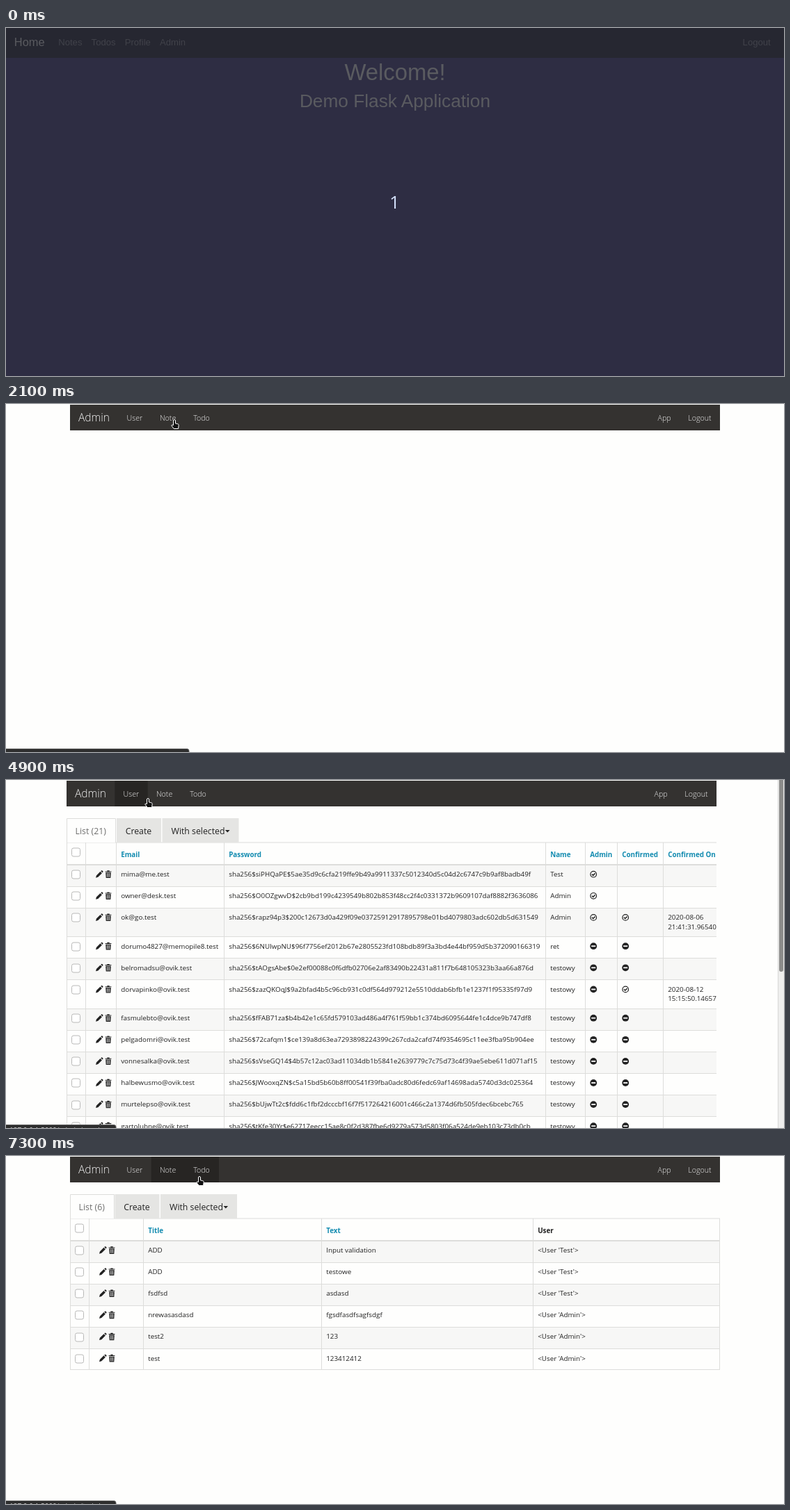
An HTML page that plays this animation: 1118 px wide and 501 px high, repeating every 8000 ms.

```html
<!DOCTYPE html>
<html lang="en">
<head>
<meta charset="utf-8">
<title>Admin demo</title>
<style>
  html, body { margin: 0; width: 100%; height: 100%; overflow: hidden; background: #fefefd; }
  svg { display: block; width: 1118px; height: 501px; }
  text { white-space: pre; }
  .home { font-family: "Liberation Sans", Arial, sans-serif; }
  .admin { font-family: "Open Sans", "Noto Sans", sans-serif; }
  .nav { font-weight: 300; }
</style>
</head>
<body>
<svg id="stage" viewBox="0 0 1118 501"></svg>
<script>
const LOOP = 8000;
const LINE = '#dddddb', BAR = '#343230', DARK = '#272523', BLUE = '#128bb0';

const esc = s => s.replace(/&/g, '&amp;').replace(/</g, '&lt;');
const text = (x, y, s, size, fill = '#222', extra = '') =>
  `<text x="${x}" y="${y}" font-size="${size}" fill="${fill}" ${extra}>${esc(s)}</text>`;
const rect = (x, y, w, h, fill, extra = '') =>
  `<rect x="${x}" y="${y}" width="${w}" height="${h}" fill="${fill}" ${extra}/>`;
const hline = (x1, x2, y) => rect(x1, y, x2 - x1, 1, LINE);
const vline = (x, y1, y2) => rect(x, y1, 1, y2 - y1, LINE);
const group = (id, body, cls = '') => `<g id="${id}" class="${cls}">${body}</g>`;

function homePage(c) {
  return rect(0, 0, 1118, 501, c.page) + rect(0, 0, 1118, 43, c.nav) +
    text(11.8, 26, 'Home', 16.4, c.title) +
    [['Notes', 75.2], ['Todos', 122.6], ['Profile', 170.7], ['Admin', 221], ['Logout', 1058.6]]
      .map(([s, x]) => text(x, 25, s, 13.12, c.link, c.id && s === 'Admin' ? `id="${c.id}"` : '')).join('') +
    text(559, 75, 'Welcome!', 32.8, c.title, 'text-anchor="middle"') +
    text(559, 114, 'Demo Flask Application', 26.24, c.title, 'text-anchor="middle"');
}

// Nav items as [label, left edge, width], before the page offset
const ITEMS = [['User', 161.4, 47.3], ['Note', 208.7, 48.3], ['Todo', 257, 49]];
function navbar(dx, name, active) {
  let s = rect(92 + dx, 1, 934, 37, BAR);
  s += ITEMS.map(([n, x, w]) => rect(x + dx, 1, w, 37, DARK, n === active ? '' : `id="${name}${n}"`)).join('');
  const label = (n, x, size, y) => text(x + dx, y, n, size, '#eee');
  s += label('Admin', 103.9, 15.6, 25);
  ITEMS.forEach(([n, x]) => s += label(n, x + 12.2, 10.66, 24));
  s += label('App', 936.6, 10.66, 24) + label('Logout', 980.3, 10.66, 24);
  return `<g class="nav">${s}</g>`;
}

function tabs(x, count, edges) {
  const [list, create, more] = edges;
  return hline(x, x + 934, 89.5) +
    `<path d="M${x + .5} 90V55.5H${list + .5}V90" fill="#fefefd" stroke="${LINE}"/>` +
    rect(create, 55, 64, 35, '#e5e5e3') + rect(more, 55, 110, 35, '#e5e5e3') +
    text(x + 12.6, 78, `List (${count})`, 12.3, '#6f6f6e') +
    text(create + 12.7, 78, 'Create', 12.3) +
    text(more + 13, 78, 'With selected', 12.3) +
    `<path d="M${more + 90.5} 72h6.6l-3.3 3.6z" fill="#222"/>`;
}

const box = (x, y) => rect(x + .5, y - 6, 12, 12, '#fff', 'rx="2.5" stroke="#b9b9b8"');
const tools = (x, y) =>
  `<g transform="translate(${x} ${y})" fill="#222">
    <path d="M-5 5l.9-3.3 5.6-5.6 2.4 2.4-5.6 5.6zM2.2-4.6l1-.8q.7-.4 1.3.2l.8.8q.5.6 0 1.2l-.8.9z"/>
    <path d="M8.6-3.2v-1h2.7v-1.2h3.4v1.2h2.7v1zM9.2-2.5h7.6l-.5 7.7h-6.6z"/>
    <path d="M11.3-1.5v5.6M13-1.5v5.6M14.7-1.5v5.6" stroke="#fff" stroke-width=".7"/></g>`;
const yes = (x, y) =>
  `<g transform="translate(${x} ${y})" fill="none" stroke="#222"><circle r="4.3" stroke-width="1.2"/>
    <path d="M-2.2-.1l1.7 1.7 2.9-3.1" stroke-width="1.5"/></g>`;
const no = (x, y) => `<circle cx="${x}" cy="${y}" r="4.9" fill="#222"/>` + rect(x - 3, y - .9, 6, 1.8, '#fff');

// rows: {h, cells}; a cell may be text, two lines, or a boolean icon
function table(x0, x1, cols, heads, rows, toolX) {
  const top = 90;
  let y = 121.7, body = '', lines = '';
  rows.forEach((r, i) => {
    if (i % 2 === 0) body += rect(x0, y, x1 - x0, r.h, '#f7f7f6');
    const mid = y + 14;
    body += box(x0 + 7, Math.round(mid + .4)) + tools(toolX, mid);
    r.cells.forEach((c, k) => {
      const x = cols[k + 2] + 7.2;
      if (c === true) body += yes(x + 5, mid);
      else if (c === false) body += no(x + 5, mid);
      else if (c) c.split('\n').forEach((s, n) => body += text(x, Math.round(mid + 3.3 + n * 13.5), s, 9.84));
    });
    lines += hline(x0, x1, Math.round(y) - (i ? 0 : 1)) + (i ? '' : hline(x0, x1, 122));
    y += r.h;
  });
  lines += hline(x0, x1, Math.round(y) - 1);
  cols.forEach(c => lines += vline(c, top, Math.round(y)));
  heads.forEach(([s, col], k) => body += text(cols[k + 2] + 7.2, 111, s, 9.84, col, 'font-weight="700"'));
  return body + box(x0 + 7, 104) + lines;
}

const N = null;
const users = [
  ['mima@me.test', 'siPHQaPE$5ae35d9c6cfa219ffe9b49a9911337c5012340d5c04d2c6747c9b9af8badb49f', 'Test', true],
  ['owner@desk.test', 'O0OZgwvD$2cb9bd199c4239549b802b853f48cc2f4c0331372b9609107daf8882f3636086', 'Admin', true],
  ['ok@go.test', 'rapz94p3$200c12673d0a429f09e03725912917895798e01bd4079803adc602db5d631549', 'Admin', true, true, '2020-08-06\n21:41:31.965402'],
  ['dorumo4827@memopile8.test', '6NUIwpNU$96f7756ef2012b67e2805523fd108bdb89f3a3bd4e44bf959d5b372090166319', 'ret', false, false],
  ['belromadsu', 'tAOgsAbe$0e2ef00088c0f6dfb02706e2af83490b22431a811f7b648105323b3aa66a876d'],
  ['dorvapinko', 'zazQKOqJ$9a2bfad4b5c96cb931c0df564d979212e5510ddab6bfb1e1237f1f95335f97d9', N, false, true, '2020-08-12\n15:15:50.146573'],
  ['fasmulebto', 'fFAB71za$b4b42e1c65fd579103ad486a4f761f59bb1c374bd6095644fe1c4dce9b747df8'],
  ['pelgadomri', '72cafqm1$ce139a8d63ea7293898224399c267cda2cafd74f9354695c11ee3fba95b904ee'],
  ['vonnesalka', 'sVseGQ14$4b57c12ac03ad11034db1b5841e2639779c7c75d73c4f39ae5ebe611d071af15'],
  ['halbewusmo', 'JWooxqZN$c5a15bd5b60b8ff00541f39fba0adc80d6fedc69af14698ada5740d3dc025364'],
  ['murtelepso', 'bUjwTt2c$fdd6c1fbf2dcccbf16f7f517264216001c466c2a1374d6fb505fdec6bcebc765'],
  ['gartolubne', 'tKfe30Yr$e62717eecc15ae8c0f2d387fbe6d9279a573d5803f06a524de9eb103c73db0cb']
].map(([mail, hash, name, admin = false, ok, on]) => ({
  h: on ? 41.3 : 31.1,
  cells: [mail.includes('@') ? mail : mail + '@ovik.test', 'sha256$' + hash, name || 'testowy', admin,
    ok === undefined && !name ? false : ok, on]
}));
const notes = [
  ['ADD', 'Input validation', 'Test'], ['ADD', 'testowe', 'Test'], ['fsdfsd', 'asdasd', 'Test'],
  ['nrewasasdasd', 'fgsdfasdfsagfsdgf', 'Admin'], ['test2', '123', 'Admin'], ['test', '123412412', 'Admin']
].map(([a, b, u]) => ({ h: 31.1, cells: [a, b, `<User '${u}'>`] }));

const white = rect(0, 0, 1118, 501, '#fefefd');
const focus = (id, x, w) => rect(x + .5, 2.5, w, 34, 'none', `id="${id}" stroke="#cfcfcd" stroke-dasharray="1 1"`);

const pages = {
  count: homePage({ page: '#2e2d43', nav: '#262731', title: '#5a5b60', link: '#41424a' }) +
    text(558.5, 260, '1', 26, '#d3e0fa', 'text-anchor="middle" font-family="Open Sans, Noto Sans, sans-serif"'),
  welcome: homePage({ page: '#483785', nav: '#231941', title: '#fff', link: '#918ca0', id: 'homeAdmin' }),
  empty: white + navbar(0, 'empty', '') + focus('focusUser', 161, 47),
  user: white + navbar(-5, 'user', 'User') + focus('focusNote', 205, 45) +
    '<g clip-path="url(#frame)">' + tabs(87, 21, [157, 159, 224.5]) +
    table(87, 1021, [87, 114, 158, 313, 775, 832, 878, 944],
      ['Email', 'Password', 'Name', 'Admin', 'Confirmed', 'Confirmed On'].map(s => [s, BLUE]), users, 134) + '</g>' +
    rect(1109, 0, 9, 501, '#eeeeed') + rect(1109, 0, 1, 501, '#d8d8d7') + rect(1111, -4, 6, 280, '#8b8b8a', 'rx="3"'),
  note: white + navbar(0, 'note', 'Note') + tabs(92, 6, [155, 156.5, 222]) +
    table(92, 1026, [92, 119, 197, 453, 757, 1025], [['Title', BLUE], ['Text', BLUE], ['User', '#222']], notes, 139)
};

const stage = document.getElementById('stage');
stage.innerHTML = '<clipPath id="frame"><rect x="87" y="0" width="934" height="501"/></clipPath>' +
  Object.entries(pages).map(([id, s]) => group(id, s, id === 'count' || id === 'welcome' ? 'home' : 'admin')).join('') +
  group('status', `<rect id="tip" x="-3" y="496.5" height="20" rx="3" fill="#2d2d2d" stroke="#626262"/>` +
    text(5, 507.6, '', 10, '#ccc', 'id="url"'), 'admin') +
  group('hand', '<path d="M-1.5 7.5V1a1.5 1.5 0 0 1 3 0V5l3.2.6q1.6.4 1.5 2L5.6 12.5H-.8L-4.3 8q.4-1.7 2.8-.5z" fill="#111" stroke="#fff" stroke-linejoin="round"/>') +
  group('arrow', '<path d="M0 0V12l2.9-2.7 1.9 4.2 2-.9-1.9-4.1h3.8z" fill="#111" stroke="#fff" stroke-linejoin="round"/>');

// Step tables: [start time, value...]
const pageSteps = [[0, 'count'], [100, 'welcome'], [2100, 'empty'], [3700, 'user'], [6400, 'note']];
const hoverSteps = [[0, ''], [900, 'homeAdmin'], [2100, ''], [2300, 'emptyNote'], [2700, ''], [3100, 'emptyUser'],
  [3700, ''], [5300, 'userNote'], [6400, ''], [7300, 'noteTodo']];
const focusSteps = [[0, ''], [3500, 'focusUser'], [3700, ''], [6100, 'focusNote'], [6400, '']];
const statusSteps = [[0, 0, ''], [1000, 128, 'admin/'], [2100, 263, ''], [2300, 158, 'admin/note/'], [3000, 0, ''],
  [3300, 158, 'admin/user/'], [5300, 158, 'admin/note/'], [7300, 158, 'admin/todo/']];
const cursorSteps = [[0, '', 0, 0], [800, 'arrow', 249, 48], [900, 'hand', 250, 30], [1000, 'hand', 251, 13],
  [1100, 'hand', 251, 21], [1600, 'hand', 243, 22], [1800, 'hand', 242, 23], [2700, 'arrow', 222, 50],
  [2800, 'arrow', 184, 56], [3000, 'arrow', 184, 44], [3100, 'hand', 184, 30], [3300, 'hand', 184, 28],
  [3500, 'hand', 184, 27], [4600, 'hand', 188, 27], [4700, 'hand', 193, 27], [4800, 'hand', 199, 27],
  [4900, 'hand', 204, 27], [5000, 'hand', 207, 27], [5300, 'hand', 229, 22], [5600, 'hand', 228, 22],
  [6900, 'hand', 238, 25], [7000, 'hand', 257, 29], [7100, 'hand', 271, 30], [7300, 'hand', 278, 30]];

const at = (steps, t) => steps.reduce((a, s) => s[0] <= t ? s : a);
const el = id => document.getElementById(id);
const show = (id, on) => el(id).style.display = on ? '' : 'none';
const hovers = ['emptyUser', 'emptyNote', 'emptyTodo', 'userNote', 'userTodo', 'noteUser', 'noteTodo'];

function draw(t) {
  const page = at(pageSteps, t)[1], hover = at(hoverSteps, t)[1], ring = at(focusSteps, t)[1];
  Object.keys(pages).forEach(id => show(id, id === page));
  hovers.forEach(id => show(id, id === hover));
  ['focusUser', 'focusNote'].forEach(id => show(id, id === ring));
  el('homeAdmin').setAttribute('fill', hover === 'homeAdmin' ? '#c8c5cf' : '#918ca0');

  const [, width, path] = at(statusSteps, t);
  show('status', width);
  el('tip').setAttribute('width', width + 3);
  el('url').textContent = path && '127.0.0.1:5000/' + path;

  const [, kind, x, y] = at(cursorSteps, t);
  ['hand', 'arrow'].forEach(id => show(id, id === kind));
  if (kind) el(kind).setAttribute('transform', `translate(${x} ${y})`);
}

const start = performance.now();
function tick() {
  draw((performance.now() - start) % LOOP);
  requestAnimationFrame(tick);
}
draw(0);
requestAnimationFrame(tick);
</script>
</body>
</html>
```
